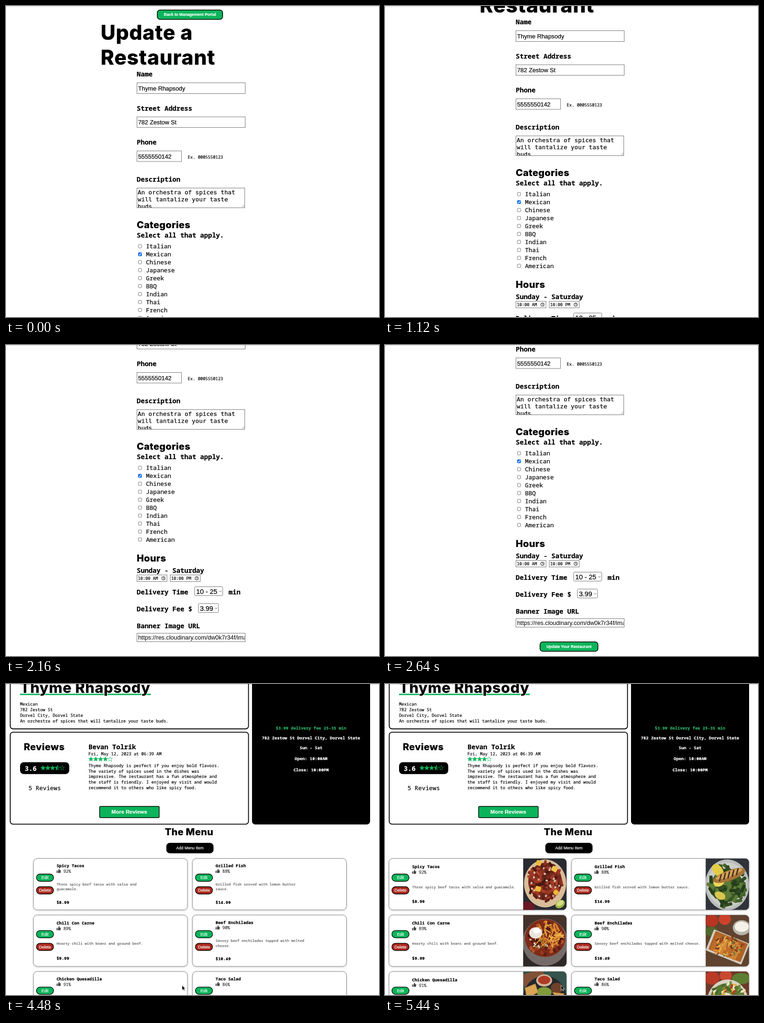
These frames come from a looping animation (796 px wide and 662 px high, 5.52 s). An HTML page:

```html
<!DOCTYPE html>
<html lang="en">
<head>
<meta charset="utf-8">
<title>Update a Restaurant</title>
<style>
  html, body { margin: 0; width: 100%; height: 100%; overflow: hidden; background: #fff; }
  svg { display: block; }
  .head { font: 800 20.3px Inter, sans-serif; letter-spacing: .02em; }
  .mono { font-family: "Noto Sans Mono", "DejaVu Sans Mono", monospace; }
  .menlo { font-family: "DejaVu Sans Mono", monospace; }
  .arial { font-family: "Liberation Sans", Arial, sans-serif; }
  .bold { font-weight: 700; }
  .mid { text-anchor: middle; }
  .card { filter: drop-shadow(0 1px 2px rgba(0, 0, 0, .2)); }
</style>
</head>
<body>
<svg id="stage" width="796" height="662" viewBox="0 0 796 662"></svg>
<script>
const GREEN = '#0bb45a', RED = '#ac2a1e', GREY = '#767676';
const LOOP = 5520, STEP = 80, PAGE_CHANGE = 4480, IMAGES_READY = 4880;
const NAME = 'Thyme Rhapsody', STREET = '782 Zestow St', PLACE = 'Dorvel City, Dorvel State';

// --- drawing helpers -------------------------------------------------
// A hairline stroke gives all type slightly heavier stems.
const text = (x, y, s, size, cls, fill = '#000', extra = `stroke="${fill}" stroke-width=".2"`) =>
  `<text x="${x}" y="${y}" class="${cls}" style="font-size:${size}px" fill="${fill}" ${extra}>${s}</text>`;
const box = (x, y, w, h, r = 0, fill = '#fff', stroke = GREY, line = 1, extra = '') =>
  `<rect x="${x}" y="${y}" width="${w}" height="${h}" rx="${r}" fill="${fill}" stroke="${stroke}" stroke-width="${line}" ${extra}/>`;
const path = (d, stroke, width = 1, fill = 'none') =>
  `<path d="${d}" fill="${fill}" stroke="${stroke}" stroke-width="${width}"/>`;
const oval = (x, y, rx, ry, fill, turn = 0) =>
  `<ellipse cx="${x}" cy="${y}" rx="${rx}" ry="${ry}" fill="${fill}" transform="rotate(${turn} ${x} ${y})"/>`;
const block = (x, y, w, h, fill, turn = 0) =>
  box(x, y, w, h, 2, fill, 'none', 0, `transform="rotate(${turn} ${x + w / 2} ${y + h / 2})"`);
const heading = (x, y, s, size = 20.3, extra) => text(x, y, s, size, 'head', '#000', extra);
const label = (y, s, x = 279) => text(x, y, s, 14.1, 'mono bold');
const small = (x, y, s, cls = '', fill = '#000') => text(x, y, s, 8.96, 'mono ' + cls, fill);
const field = (y, h, w = 231) => box(279.5, y, w, h);
const value = (y, s, extra) => text(282, y, s, 12.8, 'arial', '#000', extra);
const button = (x, y, w, s) => box(x, y, w, 20, 6, GREEN, '#000', 1.5)
  + text(x + w / 2, y + 12.8, s, 8.5, 'arial bold mid', '#fff');

function star(cx, cy, fill) {
  const points = Array.from({ length: 11 }, (_, i) => {
    const a = (i * 36 - 90) * Math.PI / 180, r = i % 2 ? 2.2 : 5.2;
    return `${cx + r * Math.cos(a)},${cy + r * Math.sin(a)}`;
  });
  const shape = (list, color) => `<polygon points="${list.join(' ')}" fill="${color}" stroke="${GREEN}" stroke-width=".7"/>`;
  return shape(points, fill === 1 ? GREEN : 'none') + (fill === .5 ? shape(points.slice(5), GREEN) : '');
}
const stars = (x, y, rating) => [0, 1, 2, 3, 4]
  .map(i => star(x + i * 10.25, y, Math.max(0, Math.min(1, rating - i)))).join('');

// --- form page -------------------------------------------------------
const checkbox = (s, i) => {
  const y = 508 + i * 16.95, on = s === 'Mexican';
  return box(282.5, y, 7, 7, 1.3, on ? '#0b6bea' : '#fff', on ? '#0b6bea' : GREY)
    + (on ? path(`M284 ${y + 3.7}l1.5 1.6 3-4`, '#fff', 1.3) : '')
    + text(298.7, y + 8.3, s, 12.8, 'mono');
};
const timeInput = (x, s) => box(x, 739.5, 64, 14)
  + text(x + 2, 750, s, 8.9, 'menlo')
  + `<circle cx="${x + 56.5}" cy="746.6" r="3.6" fill="none" stroke="#000"/>` + path(`M${x + 56.5} 744.3v2.6h2`, '#000', .8);
const select = (x, y, w, s) => box(x, y, w, 19, 2)
  + text(x + 3.5, y + 15, s, 14.4, 'arial')
  + path(`M${x + w - 7.5} ${y + 8.8}l2.3 2.3 2.3-2.3`, '#444', 1);

const cuisines = ['Italian', 'Mexican', 'Chinese', 'Japanese', 'Greek', 'BBQ', 'Indian', 'Thai', 'French', 'American'];
const formPage = [
  button(322.8, 8.5, 139.5, 'Back to Management Portal'),
  heading(202, 71.5, 'Update a', 43.4), heading(202, 125, 'Restaurant', 43.4),
  label(150, 'Name'), field(163.5, 23), value(179.7, NAME),
  label(222.5, 'Street Address'), field(236, 22.5), value(252.2, STREET),
  label(295, 'Phone'), field(308.5, 22.5, 95), value(324.6, '5555550142'),
  small(388, 324.5, 'Ex. 0005550123'),
  label(373.8, 'Description'), box(279.5, 387.5, 230, 42),
  '<g clip-path="url(#area)">',
  ...['An orchestra of spices that', 'will tantalize your taste', 'buds.']
    .map((s, i) => text(281, 401 + i * 14.8, s, 12.8, 'menlo')),
  '</g>', path('M503.5 428l5-5m-2 5l2-2', '#777', .8),
  heading(279, 473, 'Categories'), label(493, 'Select all that apply.'),
  ...cuisines.map(checkbox),
  heading(279, 711, 'Hours'), label(735, 'Sunday - Saturday'),
  timeInput(279.5, '10:00 AM'), timeInput(350.5, '10:00 PM'),
  label(780.5, 'Delivery Time'), select(402.5, 764.5, 60, '10 - 25'), label(780.5, 'min', 475),
  label(816.5, 'Delivery Fee $'), select(410.5, 800.5, 43, '3.99'),
  label(853, 'Banner Image URL'), field(863.5, 18),
  value(877, 'https://res.cloudinary.com/dw0k7r34f/image', 'clip-path="url(#url)"'),
  button(330.8, 913, 123.7, 'Update Your Restaurant')
].join('');

// --- food pictures, each 92 x 109 --------------------------------------
function scatter(count, cx, cy, rx, ry, w, h, colors) {
  let seed = count * 97 + cx;
  const random = () => (seed = (seed * 16807 + 11) % 2147483647) / 2147483647;
  random();
  return Array.from({ length: count }, () => {
    const a = random() * 7, d = Math.sqrt(random());
    return block(cx + rx * d * Math.cos(a) - w / 2, cy + ry * d * Math.sin(a) - h / 2, w, h,
      colors[Math.floor(random() * colors.length)], random() * 180);
  }).join('');
}
const ground = color => block(-2, -2, 97, 114, color);
const pictures = [
  ground('#292a32') + oval(8, 104, 17, 12, '#6b1823') + oval(47, 53, 45, 51, '#d9bc98')
    + oval(47, 49, 36, 40, '#74281c')
    + scatter(110, 47, 50, 36, 41, 12, 5, ['#5e2018', '#8e3020', '#b2452b', '#471713', '#a23a24'])
    + scatter(22, 47, 50, 32, 36, 5, 4, ['#d8c2ad', '#c9a58c'])
    + block(28, 4, 11, 11, '#f0b93a', 20) + block(61, 17, 12, 11, '#f3c24b', 30)
    + block(26, 59, 12, 11, '#efb637', 12) + block(65, 67, 10, 10, '#efb637', 40)
    + oval(79, 97, 11, 8, '#9fb845', -35) + oval(79, 95, 8, 5, '#d5dc86', -35),
  ground('#30343a') + oval(46, 56, 47, 54, '#b9bcba') + oval(46, 56, 42, 48, '#cccdc9')
    + oval(46, 57, 33, 36, '#3b5726')
    + scatter(90, 46, 58, 38, 42, 17, 7, ['#2f4a20', '#45652b', '#5d7b36', '#273d1d'])
    + oval(26, 25, 15, 10, '#e3cb45', 50) + oval(29, 49, 13, 10, '#ecd55c', -35)
    + oval(51, 36, 36, 11, '#a87337', -20) + oval(50, 33, 30, 6, '#d3a35a', -20)
    + [0, 1, 2, 3, 4].map(i => block(30 + i * 9, 33 - i * 3.2, 3, 16, '#4b3020', 15)).join('')
    + oval(31, 79, 12, 8, '#d8c64e', 25),
  ground('#44332b') + block(-2, 76, 96, 36, '#2e2828') + oval(47, 58, 48, 50, '#756b68')
    + oval(47, 49, 43, 40, '#7e2b18')
    + scatter(70, 47, 50, 38, 35, 8, 6, ['#5c1e13', '#98391e', '#b5542a', '#431913'])
    + scatter(60, 54, 42, 28, 25, 17, 2, ['#e49a35', '#f0b54d', '#d88528'])
    + oval(27, 38, 14, 12, '#e9e5dd') + oval(29, 33, 8, 6, '#fff')
    + scatter(12, 31, 61, 22, 12, 5, 3, ['#6f8e3c', '#e6d3c0']),
  ground('#5f432f') + oval(13, 12, 14, 13, '#b73522') + oval(41, 9, 13, 12, '#cc4229')
    + oval(12, 35, 14, 10, '#52672c') + oval(77, 27, 19, 16, '#b9b4ab') + oval(77, 25, 15, 11, '#f4f1e8')
    + block(6, 44, 82, 48, '#d2ccc0', 22) + block(11, 46, 74, 42, '#b06427', 22)
    + [0, 1, 2, 3].map(i => block(16 + i * 14, 44 + i * 6, 13, 34, i % 2 ? '#cf8434' : '#bd6c2b', 28)).join('')
    + scatter(60, 47, 66, 34, 20, 9, 3, ['#e8ae4c', '#9f3e1e', '#dd943c', '#7a3a1c', '#60753a']),
  ground('#35544b') + block(-2, 0, 48, 27, '#805137', -18) + oval(46, 60, 47, 51, '#24272c')
    + oval(45, 19, 17, 13, '#d2b398') + oval(45, 18, 13, 9, '#ad3a24')
    + oval(72, 35, 13, 11, '#70402a') + oval(45, 44, 16, 11, '#809b3b')
    + path('M4 35L26 26 32 44 8 58zM62 44L88 47 79 65z', '#a86d31', 1, '#d9a555'),
  ground('#6b3a29') + oval(14, 14, 16, 14, '#b83a27') + oval(43, 9, 13, 12, '#c94930')
    + oval(76, 15, 20, 12, '#5d7e32') + oval(47, 65, 44, 48, '#d9d2c5') + oval(47, 54, 36, 29, '#587832')
    + scatter(80, 48, 52, 36, 28, 11, 5, ['#6f9138', '#486a2b', '#b33e27', '#e4ac48', '#efe5ca'])
];

// --- restaurant page -----------------------------------------------------
const dishes = [
  { name: 'Spicy Tacos', likes: 92, price: '$8.99', lines: ['Three spicy beef tacos with salsa and', 'guacamole.'] },
  { name: 'Grilled Fish', likes: 88, price: '$14.99', lines: ['Grilled fish served with lemon butter', 'sauce.'] },
  { name: 'Chili Con Carne', likes: 89, price: '$9.99', lines: ['Hearty chili with beans and ground beef.'] },
  { name: 'Beef Enchiladas', likes: 90, price: '$10.49', lines: ['Savory beef enchiladas topped with melted', 'cheese.'] },
  { name: 'Chicken Quesadilla', likes: 91, price: '', lines: ['', ''] },
  { name: 'Taco Salad', likes: 86, price: '', lines: ['', ''], alwaysWraps: true }
];
const pill = (x, y, s, color) => box(x + 6.2, y, 36.6, 15.5, 7.8, color, '#000', 1.3)
  + text(x + 24.5, y + 10.8, s, 8.8, 'arial mid', '#fff');
const thumb = (x, y) => path(`M${x} ${y - 4.5}h2v5h-2zM${x + 3} ${y - 4}l2.2-4.3q1.7 0 1 3.2h2.8l-.8 5.6h-5.2z`, 'none', 0, '#444');

function card(dish, i, loaded) {
  const right = i % 2, top = 371.5 + Math.floor(i / 2) * 120.3;
  const x = right ? 398 : loaded ? 8.5 : 58.7;
  const width = loaded ? 378.7 : 328.5, tx = x + 49.3;
  const wrapped = dish.lines.length > 1 && (!loaded || dish.alwaysWraps);
  const lines = wrapped ? dish.lines : [dish.lines.join(' ')];
  const y = top + (wrapped ? 0 : 1.8);
  return box(x, top, width, 109.3, 8, '#fff', '#888', 1, 'class="card"')
    + pill(x, top + 33, 'Edit', GREEN) + pill(x, top + 60, 'Delete', RED)
    + small(tx, y + 18.8, dish.name, 'bold')
    + thumb(tx, y + 30.2) + small(tx + 14.5, y + 30.6, dish.likes + '%', '', '#333')
    + lines.map((s, n) => text(tx, top + (wrapped ? 57.5 : 63.2) + n * 10.3, s, 7.7, 'mono', '#555')).join('')
    + small(tx, top + (wrapped ? 96.4 : 94.8), dish.price, 'bold')
    + (loaded ? `<g transform="translate(${x + width - 92.5} ${top})" clip-path="url(#photo)">${pictures[i]}</g>` : '');
}

const review = [
  NAME + ' is perfect if you enjoy bold flavors.',
  'The variety of spices used in the dishes was',
  'impressive. The restaurant has a fun atmosphere and',
  'the staff is friendly. I enjoyed my visit and would',
  'recommend it to others who like spicy food.'
];
const summary = ['Mexican', STREET, PLACE, 'An orchestra of spices that will tantalize your taste buds.'];
const menuPage = [
  box(9, -20, 508.5, 115.5, 6, '#fff', '#000', 1.8),
  box(9, 102.7, 508.5, 195.7, 6, '#fff', '#000', 1.8),
  box(525, -20, 252, 319, 7, '#000', 'none', 0),
  box(30, 20.6, 279, 3, 0, GREEN, 'none', 0),
  heading(30, 19, NAME, 31.2, 'stroke="#fff" stroke-width="2.6" paint-order="stroke"'),
  ...summary.map((s, i) => small(30, 46 + i * 11.9, s)),
  heading(38, 140.5, 'Reviews'),
  box(30, 166.5, 105, 25.3, 8, '#000', 'none', 0),
  text(40, 184.5, '3.6', 14.1, 'mono bold', '#fff'), stars(79, 178.7, 3.5),
  text(48, 226, '5 Reviews', 12.8, 'mono'),
  label(139, 'Bevan Tolrik', 176), small(176, 152, 'Fri, May 12, 2023 at 06:39 AM'),
  stars(181.3, 160, 4),
  ...review.map((s, i) => small(176, 176.7 + i * 11.85, s)),
  box(199.8, 260.5, 127.2, 24, 2, GREEN, '#000', 1.4),
  text(263, 276.4, 'More Reviews', 11.4, 'arial bold mid', '#fff'),
  small(651, 97.3, '$3.99 delivery fee 25-35 min', 'bold mid', '#2cb566'),
  small(651, 118.4, STREET + ' ' + PLACE, 'bold mid', '#fff'),
  small(651, 138.5, 'Sun - Sat', 'bold mid', '#fff'),
  small(651, 162.3, 'Open: 10:00AM', 'bold mid', '#fff'),
  small(651, 186, 'Close: 10:00PM', 'bold mid', '#fff'),
  heading(339, 322.3, 'The Menu'),
  box(342.5, 338.5, 100, 21.5, 7, '#000', '#222', 1),
  text(392.5, 352.2, 'Add Menu Item', 8.6, 'arial mid', '#fff')
].join('');
const cards = loaded => dishes.map((dish, i) => card(dish, i, loaded)).join('');

document.getElementById('stage').innerHTML = `
  <defs>
    <clipPath id="area"><rect x="280" y="388" width="229" height="41"/></clipPath>
    <clipPath id="url"><rect x="280" y="864" width="229" height="18"/></clipPath>
    <clipPath id="photo"><path d="M0 0H84.5a8 8 0 0 1 8 8V101.3a8 8 0 0 1-8 8H0z"/></clipPath>
    <linearGradient id="edge" x2="0" y2="1"><stop stop-color="#000" stop-opacity=".12"/><stop offset="1" stop-opacity="0"/></linearGradient>
  </defs>
  <g id="form">${formPage}</g>
  <g id="menu">${menuPage}<g id="plain">${cards(false)}</g><g id="loaded">${cards(true)}</g></g>
  <rect width="796" height="3" fill="url(#edge)"/>
  <path id="cursor" d="M0 0V10.2L2.4 8 4 11.6 5.8 10.8 4.2 7.3H7.4z" stroke="#fff" stroke-width=".8"/>`;

// --- motion ----------------------------------------------------------------
const [form, menu, plain, loaded, cursor] = ['form', 'menu', 'plain', 'loaded', 'cursor']
  .map(id => document.getElementById(id));
const show = (node, on) => node.setAttribute('display', on ? 'inline' : 'none');
const progress = (t, from, to) => Math.max(0, Math.min(1, (t - from) / (to - from)));
const easeOut = p => 1 - (1 - p) ** 2;
const scrollAt = t => 111 * easeOut(progress(t, 320, 1120))
  + 170 * easeOut(progress(t, 1520, 2640)) - 3 * easeOut(progress(t, 2640, 2960));

// time, x, y of the pointer tip
const pointerPath = [[2800, 51, 590], [3200, 290, 624], [3360, 322.5, 629], [3680, 375.7, 641.5]];
function pointerAt(t) {
  let [, x, y] = pointerPath[0];
  for (let i = 1; i < pointerPath.length; i++) {
    const [t0, x0, y0] = pointerPath[i - 1], [t1, x1, y1] = pointerPath[i];
    const p = progress(t, t0, t1);
    x += (x1 - x0) * p;
    y += (y1 - y0) * p;
  }
  return [x, y];
}

function draw(now) {
  const t = Math.floor((now % LOOP) / STEP) * STEP;
  show(form, t < PAGE_CHANGE);
  show(menu, t >= PAGE_CHANGE);
  show(plain, t < IMAGES_READY);
  show(loaded, t >= IMAGES_READY);
  show(cursor, t >= pointerPath[0][0]);
  form.setAttribute('transform', `translate(0 ${-Math.round(scrollAt(t))})`);
  cursor.setAttribute('transform', `translate(${pointerAt(t)})`);
}
const start = performance.now();
function tick() {
  draw(performance.now() - start);
  requestAnimationFrame(tick);
}
tick();
</script>
</body>
</html>
```
